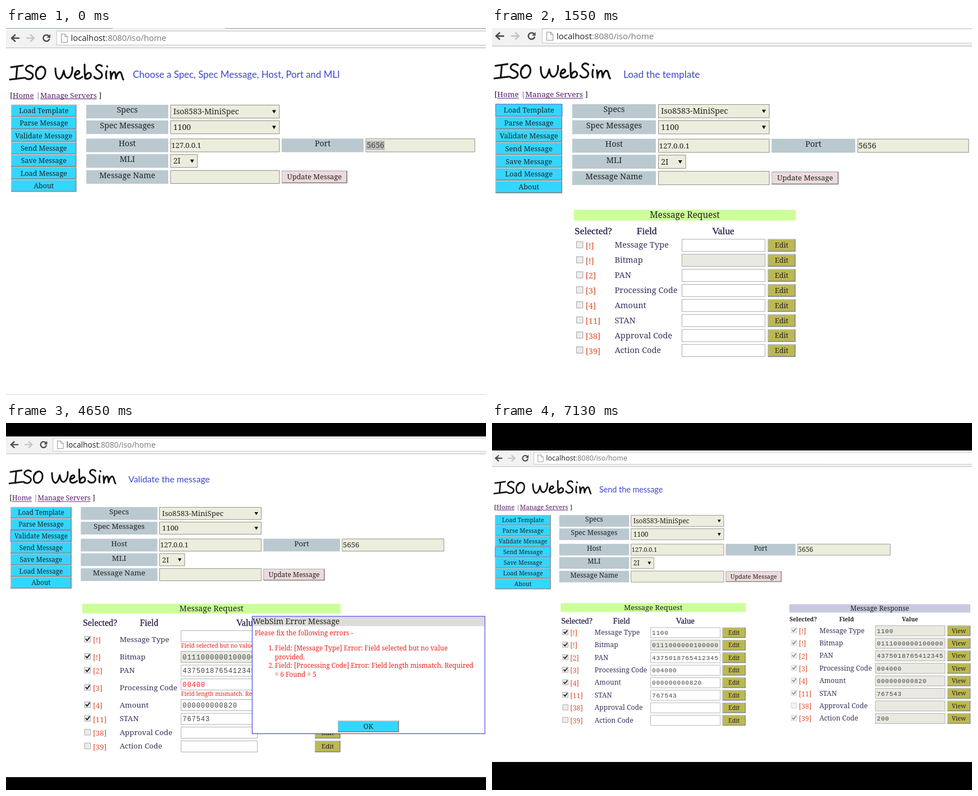
An HTML page with a canvas for the animation above (7750 ms loop, 855 px wide and 655 px high).

```html
<!DOCTYPE html>
<html lang="en">
<head>
<meta charset="utf-8">
<title>ISO WebSim</title>
<style>
html, body { margin: 0; width: 100%; height: 100%; overflow: hidden; background: #000; }
canvas { display: block; }
</style>
</head>
<body>
<canvas id="stage" width="855" height="655"></canvas>
<script>
const ctx = document.getElementById('stage').getContext('2d');
const SERIF = '"Noto Serif", serif', SANS = '"Open Sans", sans-serif';
const MONO = '"Liberation Mono", monospace', BOOK = '"Liberation Serif", serif';
const HOLD = 1550;
const CYAN = '#33d6ff', OLIVE = '#bdb850', NAVY = '#34345c', CREAM = '#ededdd', RED = '#f0201c';

const MENU = ['Load Template', 'Parse Message', 'Validate Message', 'Send Message',
  'Save Message', 'Load Message', 'About'];
const FIELDS = [['!', 'Message Type'], ['!', 'Bitmap'], ['2', 'PAN'], ['3', 'Processing Code'],
  ['4', 'Amount'], ['11', 'STAN'], ['38', 'Approval Code'], ['39', 'Action Code']];
const TITLE = new Path2D(
  'M9 70L30 67M20 69L18 91M7 92L32 89' +
  'M48 69C42 64 33 70 36 75C39 79 48 79 48 85C47 92 38 93 34 89' +
  'M61 70C52 70 50 90 59 91C70 92 75 72 64 69C61 68 57 71 56 75' +
  'M88 72C88 82 90 90 95 91C100 90 102 80 103 76C104 84 106 90 111 89C117 86 119 76 118 70' +
  'M123 84C128 83 133 80 130 77C126 74 121 82 123 88C126 93 133 90 136 87' +
  'M140 65C140 75 140 84 141 90C141 82 148 77 151 82C153 88 147 92 141 90' +
  'M171 68C166 63 158 68 161 73C164 77 172 78 171 85C169 92 160 92 157 87' +
  'M179 77C178 82 178 87 179 90M180 68l.5 1' +
  'M186 78C187 83 187 87 187 91C187 84 191 77 194 79C196 82 195 87 196 90C197 83 201 77 204 79C207 82 206 88 209 92');

const sent = ['', '0111000000100000', '4375018765412345', '00400', '000000000820', '767543', '', ''];
const fixed = Object.assign([...sent], { 0: '1100', 3: '004000' });
const reply = Object.assign([...fixed], { 7: '200' });
const firstSix = i => i < 6;

// page: visible area; view: scale x, scale y, offset x, offset y
const SCENES = [
  { page: [0, 0, 855, 655], view: [1, 1, 0, 0], foot: 654, selectPort: true,
    caption: ['Choose a Spec, Spec Message, Host, Port and MLI', 226, 88.5] },
  { page: [0, 0, 855, 655], view: [1.0203, 1.0226, -2.95, -4.1], active: 0,
    caption: ['Load the template', 234, 88.5],
    tables: [{ values: [], checked: () => false }] },
  { page: [7, 0, 840, 655], view: [1, 1, 8, -3.7], foot: 651,
    caption: ['Build a message', 245, 87.5],
    tables: [{ values: sent, checked: firstSix, focus: 3 }] },
  { page: [0, 24, 855, 608], view: [.9346, .936, -.4, 21.8], active: 2, dialog: true,
    caption: ['Validate the message', 218, 106],
    tables: [{ values: sent, checked: firstSix, extra: 105,
      errors: { 0: 'Field selected but no value provided.', 3: 'Field length mismatch. Required = 6 Found = 5' } }] },
  { page: [0, 49, 855, 556], view: [.852, .852, -2.1, 47.6], active: 3,
    caption: ['Send the message', 191, 123.5],
    tables: [{ values: fixed, checked: firstSix },
      { values: reply, checked: i => i !== 6, response: true }] }
];

function rect(x, y, w, h, color) {
  ctx.fillStyle = color;
  ctx.fillRect(x, y, w, h);
}

function frame(x, y, w, h, color, width = 1) {
  ctx.strokeStyle = color;
  ctx.lineWidth = width;
  ctx.strokeRect(x + width / 2, y + width / 2, w - width, h - width);
}

function text(str, x, y, size, color = '#222', font = SERIF, align = 'left') {
  ctx.font = (font === 'bold' ? 'bold ' : '') + size + 'px ' + (font === 'bold' ? SERIF : font);
  ctx.letterSpacing = font === MONO ? '.9px' : '0px';
  ctx.fillStyle = color;
  ctx.textAlign = align;
  ctx.fillText(str, x, y);
}

function line(color, width, ...pts) {
  ctx.strokeStyle = color;
  ctx.lineWidth = width;
  ctx.beginPath();
  pts.forEach(([x, y]) => ctx.lineTo(x, y));
  ctx.stroke();
}

function triangle(color, ...pts) {
  ctx.fillStyle = color;
  ctx.beginPath();
  pts.forEach(([x, y]) => ctx.lineTo(x, y));
  ctx.fill();
}

function button(label, x, y, w, h, color, size = 12.5, active = false) {
  rect(x, y, w, h, '#7d8488');
  rect(x, y, w - 1.8, h - 1.8, '#b3c3c8');
  rect(x + 1.2, y + 1.2, w - 3, h - 3, color);
  if (active) frame(x - .5, y - .5, w + 1, h + 1, '#5b9bea', 1.6);
  text(label, x + w / 2, y + h / 2 + size * .35, size, '#222', SERIF, 'center');
}

function input(value, x, y, w, h, size = 14, opts = {}) {
  const { font = SERIF, fill = CREAM, border = '#8f8f88', pad = 1.5, color = '#222' } = opts;
  rect(x, y, w, h, fill);
  frame(x, y, w, h, border);
  ctx.save();
  ctx.beginPath();
  ctx.rect(x + 1, y, w - 2, h);
  ctx.clip();
  text(value, x + pad, y + h / 2 + size * .35, size, color, font);
  ctx.restore();
}

function select(value, x, y, w) {
  input(value, x, y, w, 24.3, 14, { pad: 5 });
  const ax = x + w - 10, ay = y + 9.5;
  triangle('#111', [ax - 3.5, ay], [ax + 3.5, ay], [ax, ay + 6]);
}

function label(str, x, y) {
  rect(x, y, 146, 24.3, '#bac9d0');
  text(str, x + 73, y + 14, 14.1, '#222', SERIF, 'center');
}

function toolbar() {
  rect(-10, 0, 1050, 36, '#f2f2f2');
  rect(-10, 35, 1050, 1, '#b9b9b9');
  rect(90, 5, 950, 26, '#fff');
  frame(90, 5, 950, 26, '#c2c2c2');
  const arrow = (x, dir, color) => {
    line(color, 2.6, [x - 7 * dir, 18], [x + 6 * dir, 18]);
    line(color, 2.6, [x, 12.5], [x + 6 * dir, 18], [x, 23.5]);
  };
  arrow(16, -1, '#4d4d4d');
  arrow(44, 1, '#c6c6c6');
  ctx.strokeStyle = '#4d4d4d';
  ctx.lineWidth = 2.5;
  ctx.beginPath();
  ctx.arc(72, 18, 5.6, .35, 5.5);
  ctx.stroke();
  triangle('#4d4d4d', [79, 11], [79, 17.5], [72.5, 17.5]);
  line('#8d8d8d', 1, [98.5, 11], [105, 11], [109.5, 15.5], [109.5, 25.5], [98.5, 25.5], [98.5, 10.5]);
  line('#8d8d8d', 1, [105, 11], [105, 15.5], [109.5, 15.5]);
  text('localhost', 115.5, 23.3, 14.76, '#222', SANS);
  const x = 115.5 + ctx.measureText('localhost').width;
  text(':8080/iso/home', x, 23.3, 14.76, '#777', SANS);
}

function form(scene) {
  ctx.strokeStyle = '#111';
  ctx.lineWidth = 3.1;
  ctx.stroke(TITLE);

  text('[', 7, 124.6, 13.2);
  text('|', 53.5, 124.6, 13.2, '#555');
  text(']', 165.5, 124.6, 13.2);
  for (const [str, x] of [['Home', 12], ['Manage Servers', 61]]) {
    text(str, x, 124.6, 13.2, '#551a6b');
    rect(x, 126, ctx.measureText(str).width, 1, '#551a6b');
  }

  MENU.forEach((str, i) => button(str, 9, 136.8 + 22.3 * i, 116.5, 21.8, CYAN, 12.5, scene.active === i));

  label('Specs', 143, 137);
  label('Spec Messages', 143, 165);
  label('Host', 143, 197.3);
  label('MLI', 143, 225.2);
  label('Message Name', 143, 253.7);
  label('Port', 491, 197.3);
  select('Iso8583-MiniSpec', 293, 137, 194.5);
  select('1100', 293, 165, 194.5);
  select('2I', 293, 225.2, 48.5);
  input('127.0.0.1', 293, 197.3, 194.5, 24.3, 13);
  input('', 293, 253.7, 194.5, 24.3);
  input('5656', 641, 197.3, 194.5, 24.3);
  if (scene.selectPort) {
    rect(642, 201, 32.5, 17, '#bdbdbd');
    text('5656', 642.5, 214.4, 14, '#444');
  }
  button('Update Message', 491, 254.7, 117, 22.5, '#eedadb', 12.7);
}

function checkbox(x, y, on, dim) {
  rect(x, y, 12, 12, dim ? '#f3f3f3' : '#ececec');
  frame(x, y, 12, 12, dim ? '#cfcfcf' : '#a6a6a6');
  if (on) line(dim ? '#8e8e8e' : '#222', 2.1, [x + 2.7, y + 6], [x + 5, y + 8.7], [x + 9.5, y + 2.8]);
}

function table({ values, checked, focus, errors = {}, extra = 0, response }) {
  const dx = response ? 470 : 0, left = response ? 478 : 0;
  let y = response ? 368.2 : 372.1;
  if (response) {
    rect(624, 323.7, 378.5, 17.6, '#c8c9de');
    text('Message Response', 813, 337.3, 14.1, '#222', SERIF, 'center');
    text('Selected?', 624.5, 359.7, 12, '#222', 'bold');
    text('Field', 728.5, 359.7, 12, '#222', 'bold');
    text('Value', 859.5, 359.7, 12, '#222', 'bold');
  } else {
    rect(146, 321.3, 387 + extra, 18.6, '#ccff99');
    text('Message Request', 339.5 + extra / 2, 336, 15.2, '#222', SERIF, 'center');
    [['Selected?', 147], ['Field', 255.5], ['Value', 387 + extra / 2]].forEach(([str, x]) => {
      text(str, x, 363.8, 17.1, '#221c48', BOOK);
      ctx.strokeStyle = '#221c48';
      ctx.lineWidth = .3;
      ctx.strokeText(str, x, 363.8);
    });
  }
  FIELDS.forEach(([tag, name], i) => {
    const error = errors[i], mid = y + (error ? 6.6 : 0);
    checkbox(150 + left, mid + 4.2, checked(i), response);
    text(`[${tag}]`, 166 + left, mid + 17, 14.4, '#e2512f');
    text(name, 217 + dx, mid + 15.7, 14.3, NAVY);
    input(values[i] || '', 334 + dx, y, 146, 22.3, 13, {
      font: MONO, pad: 3, fill: response || i === 1 ? '#e9e9e1' : '#fff',
      border: '#aaa', color: error && values[i] ? RED : '#444'
    });
    if (focus === i) {
      frame(333.5 + dx, y - .5, 147, 23.3, '#5f9ce0', 1.8);
      rect(381, y + 3.5, 1, 15.5, '#111');
    }
    if (error) text(error, 334, y + 33, 11, RED);
    button(response ? 'View' : 'Edit', 484.3 + dx + extra, mid + .3, 48.5, 22, OLIVE, 12.4);
    y += error ? 39.45 : 26.25;
  });
}

function dialog() {
  rect(438, 344.5, 415.5, 210.5, '#fff');
  rect(439, 345.5, 413.5, 17, '#dcdcdc');
  frame(438, 344.5, 415.5, 210.5, '#2a2ae0');
  text('WebSim Error Message', 439, 359, 14);
  text('Please fix the following errors -', 443, 379, 11.8, RED);
  text('1.', 467.5, 406, 11.7, RED);
  text('2.', 467.5, 437.3, 11.7, RED);
  ['Field: [Message Type] Error: Field selected but no value', 'provided.',
    'Field: [Processing Code] Error: Field length mismatch. Required', '= 6 Found = 5'
  ].forEach((str, i) => text(str, 479, 406 + 15.6 * i, 11.7, RED));
  button('OK', 591, 531.5, 109, 20.5, CYAN, 12);
}

function draw(scene) {
  const [sx, sy, ox, oy] = scene.view;
  rect(0, 0, 855, 655, '#000');
  ctx.save();
  ctx.beginPath();
  ctx.rect(...scene.page);
  ctx.clip();
  rect(...scene.page, '#fff');
  ctx.save();
  ctx.transform(sx, 0, 0, sy, ox, oy);
  ctx.lineCap = 'round';
  ctx.lineJoin = 'round';
  toolbar();
  form(scene);
  (scene.tables || []).forEach(table);
  ctx.restore();
  if (scene.selectPort) {
    rect(0, 0, 190, 1, '#7f9fbd');
    rect(390, 0, 465, 1, '#7f9fbd');
  }
  if (scene.foot) rect(0, scene.foot, 855, 655 - scene.foot, '#d6d6d6');
  const [str, x, y] = scene.caption;
  text(str, x, y, 16.85 * sx, '#3d46cf', 'Lato, sans-serif');
  if (scene.dialog) dialog();
  ctx.restore();
}

const start = performance.now();
let shown = -1;
function tick() {
  const index = Math.floor((performance.now() - start) / HOLD) % SCENES.length;
  if (index !== shown) draw(SCENES[shown = index]);
  requestAnimationFrame(tick);
}
tick();
</script>
</body>
</html>
```
